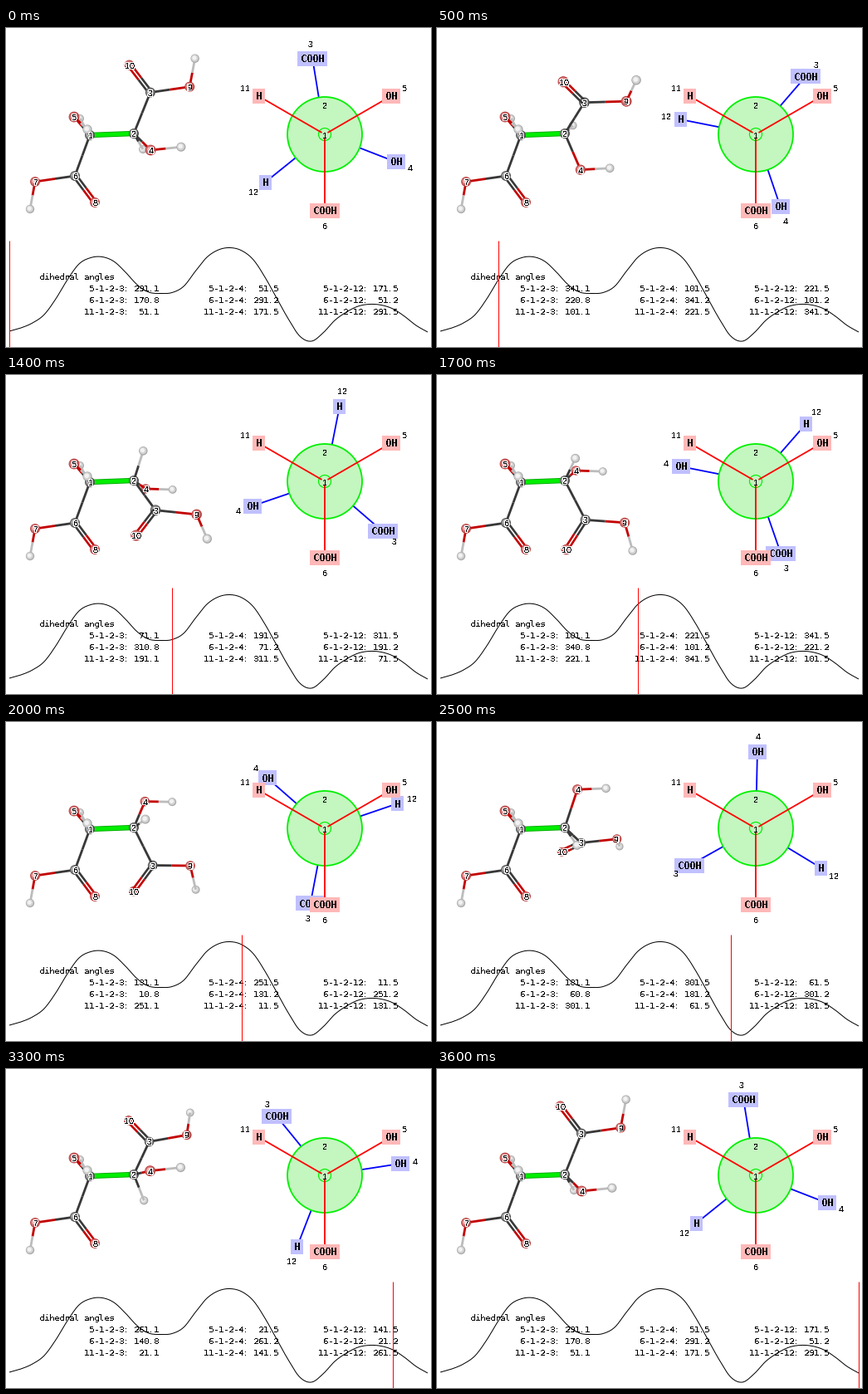
These frames come from a looping animation (512x384 px, 3700 ms). A matplotlib script:

```python
from itertools import product

import numpy as np
import matplotlib as mpl
import matplotlib.pyplot as plt
from matplotlib.animation import FuncAnimation
from matplotlib.patches import Circle, Rectangle

mpl.rcParams.update({
    "text.antialiased": False,
    "text.hinting": "native",
    "text.hinting_factor": 1,
})

W, H, DPI = 512, 384, 64
PT = 72 / DPI  # points per pixel
STEPS, STEP_DEG, STEP_MS = 37, 10, 100

fig = plt.figure(figsize=(W / DPI, H / DPI), dpi=DPI, facecolor="white")
ax = fig.add_axes([0, 0, 1, 1])
ax.set_xlim(0, W)
ax.set_ylim(H, 0)
ax.axis("off")


# ---------- drawing helpers ----------
def line(xs, ys, color, width, z=1):
    return ax.plot(xs, ys, color=color, lw=width * PT, zorder=z,
                   solid_capstyle="butt")[0]


def disc(x, y, r, fill, z, edge="none", width=0.0):
    return ax.add_patch(Circle((x, y), r, facecolor=fill, edgecolor=edge,
                               lw=width * PT, zorder=z))


def text(x, y, s, size=10, font="DejaVu Sans Mono", z=1, ha="left",
         color="black", **kw):
    """Text whose capitals are centred on y."""
    return ax.text(x, y + 0.36 * size, s, fontsize=size * PT, family=font,
                   color=color, ha=ha, va="baseline", zorder=z, **kw)


def number(x, y, s, z, color="black"):
    return text(x, y, str(s), 10, "Liberation Sans", z, "center", color)


def halo_number(x, y, s, z):
    x, y = round(x), round(y)
    ring = [number(x + dx, y + dy, s, z, "white")
            for dx, dy in product((-1, 0, 1), repeat=2) if dx or dy]
    return ring + [number(x, y, s, z + 0.1)]


# ---------- Newman projection ----------
CX, CY, DISC_R, ARM, NUM_R = 384, 128, 45, 92, 110.5
FRONT = [("H", 11, 300), ("OH", 5, 60), ("COOH", 6, 180)]
BACK = [("COOH", 3, -9.2), ("OH", 4, 111.2), ("H", 12, 231.2)]


def polar(r, deg):
    a = np.radians(deg)
    return CX + r * np.sin(a), CY - r * np.cos(a)


def substituent(name, num, deg, inner, ink, fill, z):
    x0, y0 = polar(inner, deg)
    x, y = polar(ARM, deg)
    w, h = 8 + 7 * len(name), 18
    box = Rectangle((round(x - w / 2), round(y - h / 2)), w, h, facecolor=fill,
                    edgecolor="none", antialiased=False, zorder=z)
    return [
        line([x0, x], [y0, y], ink, 1.8, z),
        ax.add_patch(box),
        text(x, y, name, 11.7, z=z + 0.1, ha="center", weight="bold"),
        number(*polar(NUM_R, deg), num, z + 0.1),
    ]


disc(CX, CY, DISC_R, "#c4f6c0", 2, "#00f000", 1.8)
disc(CX, CY, 7.5, "none", 2.1, "#00f000", 1.2)
for name, num, deg in FRONT:
    substituent(name, num, deg, 4, "#ff0000", "#ffb8b8", 3)
number(CX, CY + 1, 1, 4)
number(CX, CY - 35, 2, 4)


# ---------- energy curve and angle table ----------
X0, DX = 4, 14
ENERGY = np.array([
    365, 361, 355, 345, 326, 303, 284, 276.5, 275.5, 281, 294, 309, 318,
    319.5, 318.5, 311, 293, 276, 267, 264.5, 268, 279, 300, 325, 350, 371,
    377, 367, 352, 342, 335, 332.5, 333.5, 338, 347, 358, 366])


def smooth(y, n):
    """Cubic Hermite curve through evenly spaced values."""
    u = np.linspace(0, len(y) - 1, n)
    i = np.minimum(u.astype(int), len(y) - 2)
    f, m = u - i, np.gradient(y)
    return u, ((1 + 2 * f) * (1 - f) ** 2 * y[i] + f * (1 - f) ** 2 * m[i]
               + f * f * (3 - 2 * f) * y[i + 1] + f * f * (f - 1) * m[i + 1])


u, curve = smooth(ENERGY, 505)
line(X0 + DX * u, curve, "black", 1)
text(40, 299, "dihedral angles")

TABLE = [  # right edge, far atom, starting angles for near atoms 5, 6, 11
    (184, 3, (291.1, 170.8, 51.1)),
    (328, 4, (51.5, 291.2, 171.5)),
    (472, 12, (171.5, 51.2, 291.5)),
]


def angle_table(turn):
    out = []
    for right, far, starts in TABLE:
        for row, (near, a0) in enumerate(zip((5, 6, 11), starts)):
            s = f"{near}-1-2-{far}: {(a0 + turn) % 360:5.1f}"
            out.append(text(right - 6 * len(s), 313 + 14 * row, s))
    return out


# ---------- molecule ----------
EYE, VX, VY, TILT = 680, 125, 140, 0.038
KIND = {  # radius, rim, body, light, bond
    "C": (6, "#505050", "#8c8c8c", "#c2c2c2", "#383838"),
    "O": (6, "#b84040", "#d47070", "#f2c0c0", "#c40000"),
    "H": (5.2, "#a8a8a8", "#d2d2d2", "#f2f2f2", "#bcbcbc"),
}
FIXED = {  # kind, x, y, depth
    "1": ("C", 101, 129, 0), "2": ("C", 154, 127, 0),
    "6": ("C", 83, 178, -5), "7": ("O", 35, 185, -8),
    "8": ("O", 107, 210, -4), "h7": ("H", 29, 218, -8),
    "5": ("O", 82, 107, 43), "h5": ("H", 98, 122, 52),
    "h11": ("H", 89, 109, -30),
}
SPUN = {  # kind, shift along the axis, distance from it, phase
    "3": ("C", 22, 49, -3.7), "10": ("O", -2.2, 83, -2),
    "9": ("O", 69, 53.5, 2), "h9": ("H", 76.5, 87, 2),
    "4": ("O", 16.5, 45, 116.7), "h4": ("H", 51, 45, 113.5),
    "h12": ("H", 12, 36, 236.7),
}
BONDS = [("1", "6"), ("6", "7"), ("7", "h7"), ("1", "5"), ("5", "h5"),
         ("1", "h11"), ("2", "3"), ("3", "9"), ("9", "h9"), ("2", "4"),
         ("4", "h4"), ("2", "h12")]
DOUBLE = [("6", "8"), ("3", "10")]


def spin(t, r, phase, turn):
    a = np.radians(phase + turn)
    up, z = r * np.cos(a), r * np.sin(a)
    x, y = 154 + t - TILT * up, 127 - TILT * t - up
    s = EYE / (EYE - z)
    return VX + (x - VX) * s, VY + (y - VY) * s, z


def half_bonds(a, b, offsets, width):
    """Each half of a bond takes the colour of its own atom."""
    (ka, *pa), (kb, *pb) = a, b
    pa, pb = np.array(pa), np.array(pb)
    mid = (pa + pb) / 2
    d = (pb - pa)[:2]
    side = np.array([-d[1], d[0]]) / max(np.hypot(*d), 1e-6)
    for k, p in ((ka, pa), (kb, pb)):
        for off in offsets:
            s = side * off
            yield ((p[2] + mid[2]) / 2, "bond",
                   ([p[0] + s[0], mid[0] + s[0]],
                    [p[1] + s[1], mid[1] + s[1]], KIND[k][4], width))


def sphere(kind, x, y, z):
    r, rim, body, light, _ = KIND[kind]
    r *= EYE / (EYE - z)
    return [disc(x, y, r, rim, 5),
            disc(x - 0.3, y - 0.3, r * 0.82, body, 5),
            disc(x - 0.7, y - 0.7, r * 0.5, light, 5)]


def molecule(turn):
    atoms = dict(FIXED)
    for key, (kind, t, r, phase) in SPUN.items():
        atoms[key] = (kind, *spin(t, r, phase, turn))

    parts = [(p[3] + 2, "atom", p) for p in atoms.values()]
    for a, b in BONDS:
        parts += half_bonds(atoms[a], atoms[b], (0,), 2.8)
    for a, b in DOUBLE:
        parts += half_bonds(atoms[a], atoms[b], (-2.1, 2.1), 2.6)
    axis = ([101, 154], [129, 127])
    parts += [(0, "bond", (*axis, "#00a800", 6.4)),
              (0.01, "bond", (*axis, "#00ee00", 4.6))]

    out = []
    for _, what, args in sorted(parts, key=lambda p: p[0]):
        if what == "atom":
            out += sphere(*args)
        else:
            out.append(line(*args, z=5))
    for key, (_, x, y, _) in atoms.items():
        if key.isdigit():
            out += halo_number(x + 0.5, y, key, 6)
    return out


# ---------- animation ----------
live = []


def draw(i):
    while live:
        live.pop().remove()
    turn = STEP_DEG * i
    for name, num, deg in BACK:
        live.extend(substituent(name, num, deg + turn, DISC_R,
                                "#0000ff", "#c0c0ff", 1))
    live.extend(angle_table(turn))
    live.extend(molecule(turn))
    x = X0 + DX * i
    live.append(line([x, x], [256, H], "#ff0000", 1, 4))
    return live


anim = FuncAnimation(fig, draw, frames=STEPS, interval=STEP_MS,
                     init_func=lambda: draw(0), blit=False, repeat=True)
plt.show()
```
